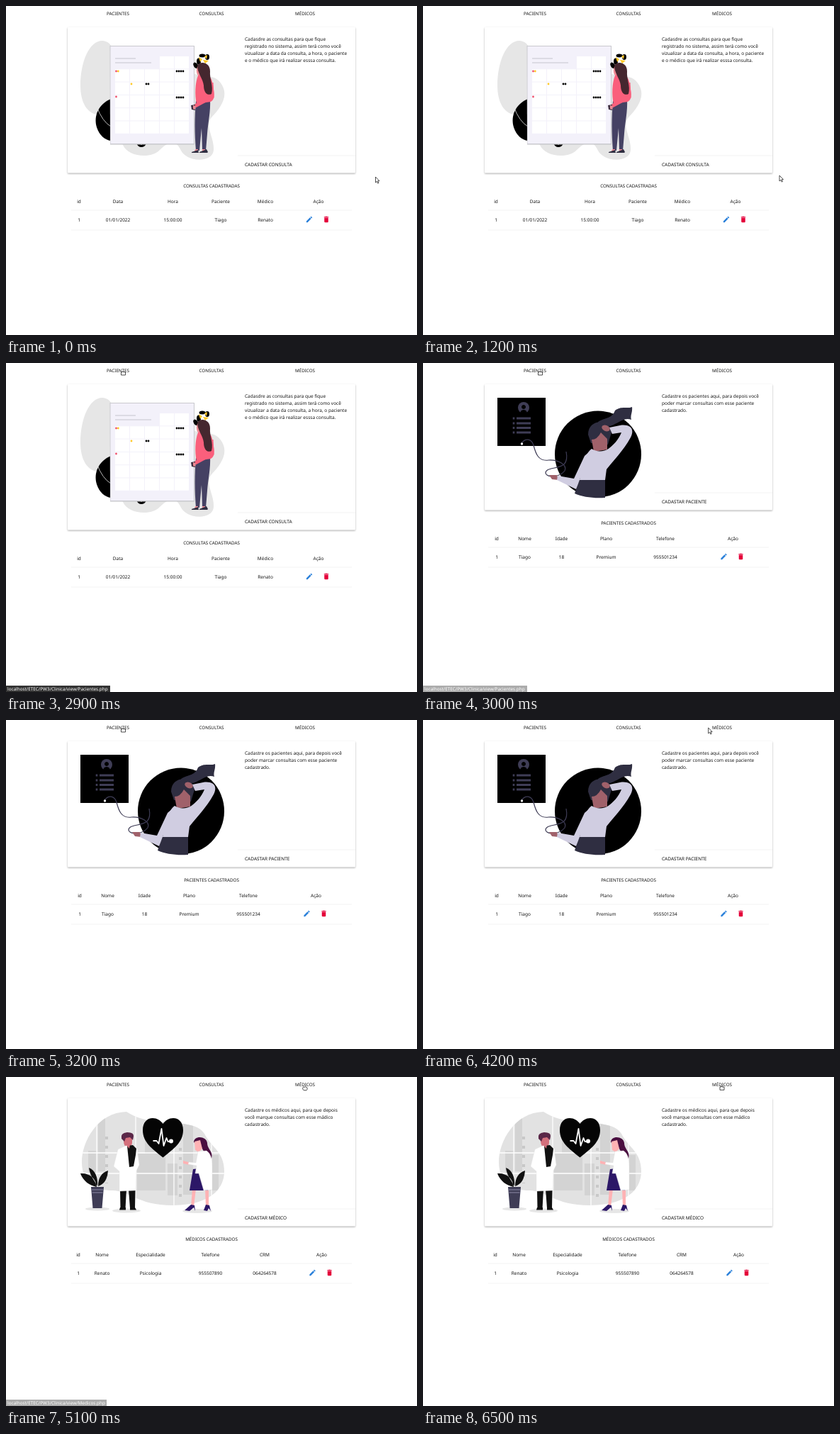
An HTML page that plays this animation: 580x464 px, repeating every 6.7 s.

```html
<!DOCTYPE html>
<html lang="pt">
<head>
<meta charset="utf-8">
<title>Clínica</title>
<style>
html, body { margin: 0; width: 100%; height: 100%; overflow: hidden; background: #fff; }
svg { display: block; width: 580px; height: 464px; }
text { font-family: "Noto Sans", "Open Sans", sans-serif; font-size: 6.5px; fill: #161616; text-rendering: geometricPrecision; }
.caps { font-size: 6.25px; fill: #111; }
.action { font-weight: 500; fill: #111; }
.mid { text-anchor: middle; }
.card { fill: #fff; filter: drop-shadow(0 1.2px .9px rgba(0,0,0,.34)); }
.rule { stroke: #f0f0f0; stroke-width: .8; }
#status text { fill: #fff; font-size: 6.37px; }
</style>
</head>
<body>
<svg viewBox="0 0 580 464">
  <defs>
    <path id="pencil" fill="#2a80da" transform="scale(.46) translate(-12 -12)" d="M3 17.25V21h3.75L17.81 9.94l-3.75-3.75zM20.71 7.04a1 1 0 0 0 0-1.41l-2.34-2.34a1 1 0 0 0-1.41 0l-1.83 1.83 3.75 3.75z"/>
    <path id="trash" fill="#e4003a" transform="scale(.46) translate(-12 -12)" d="M6 19c0 1.1.9 2 2 2h8c1.1 0 2-.9 2-2V7H6zM19 4h-3.5l-1-1h-5l-1 1H5v2h14z"/>
    <clipPath id="blob"><path d="M170 49C130 50 107 90 107 120 107 150 128 160 150 160 175 160 185 181 235 181 285 181 308 160 308 133 308 105 290 100 280 80 265 55 210 75 170 49z"/></clipPath>

    <g id="calendar">
      <path fill="#e6e6e6" d="M137 49C117 48 105 80 105 112 105 140 118 158 140 152L165 196C172 213 205 216 217 203 233 188 240 190 247 204 255 220 292 222 293 203 294 185 280 170 290 157 302 145 312 130 307 116 302 102 290 98 280 100L150 60C148 53 143 50 137 49z"/>
      <path d="M148 131C131 138 123 155 128 171 132 183 140 189 148 190z"/>
      <path d="M128 142Q136 163 148 170" fill="none" stroke="#e6e6e6" stroke-width=".8"/>
      <path d="M184 193q4-1 7 3 4-5 7-2-2 5-7 5-5 0-7-6z"/>
      <path fill="#c9c9ce" d="M146.500 56h119.500v139.500H147z"/>
      <path fill="#f3f1fa" d="M147.500 57h117.500v137h-117.500z"/>
      <path d="M154 74h29M154 80h51" stroke="#dcdbe4" stroke-width="2"/>
      <g id="cells" fill="#fff"></g>
      <g id="dots"></g>
      <g><ellipse cx="268" cy="84" rx="3" ry="5" transform="rotate(-35 268 84)"/><ellipse cx="277" cy="70" rx="4.500" ry="2.500"/><ellipse cx="272" cy="78" rx="3" ry="4.500"/><ellipse cx="284" cy="72" rx="3" ry="4"/></g>
      <path fill="#ffc928" d="M272 72l5 3-3 4zM280 71l4-2-1 6zM278 76l8 1-5 4z"/>
      <path fill="#ed8a94" d="M272 83c-4 3-4 12-1 15l6-1V84z"/>
      <path fill="#454163" d="M268 134l20-3c1 18-3 33-4 49l-2 24h-5l-1-32-3 32h-5c-2-24-2-48 0-70z"/>
      <path fill="#fa5f7c" d="M271 98c8-5 18-2 20 9 3 14 5 24-2 28l-20 3c-3-13-2-30 2-40z"/>
      <path fill="none" stroke="#fa5f7c" stroke-width="5" d="M290 108l1 20-24 13"/>
      <path fill="#45272f" d="M270 84c4-7 18-5 18 8-1 11 5 20 2 32-6 3-11-2-11-12-1-10-9-17-9-28z"/>
      <path fill="#3f3040" d="M261 140l6-1v8l-5-1z"/>
      <path fill="#ed8a94" d="M264 140l4 1-1 5-3-1zM267 202h4v4h-5zM277 202h4v3h-4z"/>
      <path fill="#2f2e41" d="M262 206l9-3 1 4h-10zM273 206l10-4 2 4-1 1h-11z"/>
    </g>

    <g id="profile">
      <path d="M105 49h68v68h-68z"/>
      <circle cx="142" cy="63" r="8" fill="#3f3d56"/>
      <path d="M142 59a3 3 0 1 0 .01 0zM137 72q0-6 5-6t5 6z"/>
      <path d="M132 78h20M132 85h20M132 91.500h20M132 98h20M126.700 78h2.600M126.700 85h2.600M126.700 91.500h2.600M126.700 98h2.600" stroke="#3f3d56" stroke-width="3"/>
      <circle cx="247" cy="128.500" r="61"/>
      <path fill="none" stroke="#3f3d56" stroke-width="1.200" d="M139 113C144 106 153 106 156 116 159 128 163 139 177 137 190 136 204 143 200 152 192 162 174 162 173 155 173 147 190 150 199 143 204 138 203 130 202 125"/>
      <circle cx="139.500" cy="114" r="1.700" fill="#fff"/>
      <path fill="#2f2e41" d="M246 84C256 76 266 80 271 67 280 60 288 65 295 62 296 70 292 74 294 80 284 76 276 85 264 89zM233 101c0-23 32-23 33-3l-5 17-24-2zM221 164l36-1v27c-17 1-32-1-43-6z"/>
      <path fill="#a0616a" d="M238 108q8 0 13-10l9 9v15l-19 3zM178 158l11 0 2 7-9-1z"/>
      <path fill="#d0cde1" d="M238 121C228 128 224 150 221 165L257 165 259 150C268 138 282 125 293 105 300 91 290 86 278 88L263 91 267 100 280 98C276 108 268 117 260 122 252 126 244 125 238 121z"/>
      <path fill="#d0cde1" d="M236 124c-8 16-13 38-20 54l-27-13 1-6 23 4 15-32z"/>
      <ellipse cx="258" cy="92" rx="6" ry="4" fill="#a0616a" transform="rotate(25 258 92)"/>
    </g>

    <g id="doctors">
      <g clip-path="url(#blob)">
        <path fill="#e2e2e2" d="M107 49h201v132H107z"/>
        <path fill="#d3d3d3" d="M130 49h10v84h-10zM116 104h13v60h-13zM185 108h13v52h-13zM196 82h29v78h-29zM228 122h14v45h-14zM250 66h14v100h-14zM288 110h12v50h-12z"/>
        <path fill="none" stroke="#c8c8c8" stroke-width="4" stroke-dasharray="4 9" d="M142 84v66M246 100v70"/>
        <path fill="none" stroke="#fff" stroke-width="1.300" d="M128 49v132M183 49v132M237 49v132M290 49v132M107 107h201M107 136h201"/>
      </g>
      <path fill="#050505" d="M221.500 113.500C206 101 193 92 193 75 193 64 199 58 207 58 213 58 218 61 221.500 66 225 61 230 58 236 58 244 58 250 64 250 75 250 92 237 101 221.500 113.500z"/>
      <path fill="none" stroke="#fff" stroke-width="1.800" stroke-linejoin="round" d="M207.500 90h5l3 4 4-21 3 24 4-11 2 5h4"/>
      <circle cx="233" cy="90.500" r="3" fill="#fff"/>
      <g fill="#e6e6e6"><ellipse cx="129" cy="186" rx="17" ry="2.500"/><ellipse cx="170" cy="188.500" rx="20" ry="3"/><ellipse cx="270" cy="189" rx="21" ry="3"/></g>
      <path fill="#111" d="M128 155C127 143 118 135 105 136 109 147 118 153 128 155zM129 154C124 145 118 138 117 128 126 131 130 142 129 154zM130 154C130 142 135 135 144 132 143 144 139 151 130 154z"/>
      <path fill="#3f3d56" d="M120 155h18l-2.500 30h-13z"/>
      <path d="M121 159h16M121.500 163h15" stroke="#8e8ba8" stroke-width="1"/>
      <path fill="#111" d="M161 158h9l-1.500 28h-7zM173 158h9.500l-.5 27h-7zM161 184h8v3.500h-9zM175 184h7l2 3.500h-9z"/>
      <path fill="#d4707c" d="M166 85h12v8q-1 6-6 7-6-2-6-10z"/>
      <path fill="#5a2748" d="M163 87q-2-8 8-9 10 0 9 6l-1 5-4-4-6 1-2 5z"/>
      <path fill="#fff" stroke="#e2e2e2" stroke-width=".4" d="M158 102l11-5h10l6 4 3 23-4 8-1 28-23 1v-28l-8-7z"/>
      <path fill="#111" d="M171 97l8-1 5 5-1 9-3 16-6 1z"/>
      <path fill="#d4707c" d="M169 95h6l-1 6z"/>
      <path fill="#4a0f40" d="M265 92C265 82 283 83 284 93 284 102 293 105 290 115 282 115 280 105 275 98z"/>
      <path fill="#ffb2b4" d="M266 91l8-2 3 12-5 5-5-3zM250 118l11 3-2 3-9-2zM263 158h5l-3 25h-4zM281 158h5v24h-4z"/>
      <path fill="#2c1767" d="M264 130l16-2 5 32h-26z"/>
      <path fill="#fff" stroke="#dedede" stroke-width=".4" d="M271 105l12-1q8 5 8 22l0 33-12 1-7-24-5 0 2-11-12-2 1-3 10 1z"/>
      <path fill="#2c1767" d="M252 188l9-8 5 1 1 8-2-5-6 5zM279 188l3-8 5 1 2 8-3-4-2 4z"/>
    </g>
  </defs>

  <g id="menu"></g>
  <g id="pages"></g>
  <g id="status"><rect y="455" height="9" fill="#333"/><text x="2" y="462"></text></g>
  <path id="cursor" fill="#fff" stroke="#222" stroke-width=".8" stroke-linejoin="round"/>
</svg>

<script>
const LOOP = 6700, STEP = 100;
const $ = id => document.getElementById(id);

// y is the middle of the line
const text = (s, x, y, cls = '') => `<text x="${x}" y="${y + 2.3}" class="${cls}">${s}</text>`;
const line = (x1, x2, y) => `<path class="rule" d="M${x1} ${y}H${x2}"/>`;

const pages = [
  { art: 'calendar', bottom: 236, action: 'CADASTAR CONSULTA', title: 'CONSULTAS CADASTRADAS',
    intro: ['Cadasdre as consultas para que fique', 'registrado no sistema, assim terá como você',
      'vizualizar a data da consulta, a hora, o paciente', 'e o médico que irá realizar esssa consulta.'],
    columns: [['id', '1', 103], ['Data', '01/01/2022', 158], ['Hora', '15:00:00', 235.5],
      ['Paciente', 'Tiago', 303], ['Médico', 'Renato', 366], ['Ação', '', 441]] },
  { art: 'profile', bottom: 208, action: 'CADASTAR PACIENTE', title: 'PACIENTES CADASTRADOS',
    intro: ['Cadastre os pacientes aqui, para depois você', 'poder marcar consultas com esse paciente', 'cadastrado.'],
    columns: [['id', '1', 104], ['Nome', 'Tiago', 143.5], ['Idade', '18', 195.5],
      ['Plano', 'Premium', 258.5], ['Telefone', '955501234', 342], ['Ação', '', 437.5]] },
  { art: 'doctors', bottom: 211, action: 'CADASTAR MÉDICO', title: 'MÉDICOS CADASTRADOS',
    intro: ['Cadastre os médicos aqui, para que depois', 'você marque consultas com esse mádico', 'cadastrado.'],
    columns: [['id', '1', 102], ['Nome', 'Renato', 135.5], ['Especialidade', 'Psicologia', 204],
      ['Telefone', '955507890', 288.5], ['CRM', '064264578', 365], ['Ação', '', 445.5]] }
];

function pageMarkup({ art, bottom, action, title, intro, columns }) {
  const actionX = columns.at(-1)[2], rowY = bottom + 65.7;
  return `<g><rect class="card" x="87" y="30" width="406" height="${bottom - 30.5}" rx="1"/>
    <use href="#${art}"/>
    ${intro.map((s, i) => text(s, 337, 46.5 + i * 10)).join('')}
    ${line(327, 493, bottom - 25)}${text(action, 337, bottom - 12.7, 'action')}
    ${text(title, 290, bottom + 17.3, 'caps mid')}
    ${columns.map(([head, value, x]) => text(head, x, bottom + 40, 'mid') + text(value, x, rowY, 'mid')).join('')}
    ${line(92, 488, bottom + 52)}${line(92, 488, bottom + 80)}
    <use href="#pencil" x="${actionX - 13}" y="${rowY - .7}"/><use href="#trash" x="${actionX + 11}" y="${rowY - .7}"/></g>`;
}

$('menu').innerHTML = [['PACIENTES', 158], ['CONSULTAS', 290], ['MÉDICOS', 422]]
  .map(([s, x]) => text(s, x, 11, 'caps mid')).join('');
$('pages').innerHTML = pages.map(pageMarkup).join('');

let cells = '';
for (let row = 0; row < 6; row++)
  for (let col = row ? 0 : 3; col < 5; col++)
    cells += `<rect x="${154 + col * 21}" y="${71 + row * 18.3}" width="20" height="17.3"/>`;
$('cells').innerHTML = cells;

const dots = (x, y, n, color) => Array.from({ length: n }, (_, i) =>
  `<circle cx="${x + i * 3}" cy="${y}" r="1.4" fill="${color}"/>`).join('');
$('dots').innerHTML = dots(155.5, 92, 1, '#f0526e') + dots(158.3, 92, 1, '#ffc928') + dots(177, 110, 1, '#ffc928') +
  dots(155.5, 128, 1, '#f0526e') + dots(241, 92, 4, '#000') + dots(198, 110, 2, '#000') + dots(241, 129, 4, '#000');

// time, x, y
const path = [[0, 521.5, 241], [1100, 521.5, 241], [1200, 503, 239], [1400, 503, 239], [1500, 430, 214],
  [1600, 349, 182], [1800, 240, 85], [1900, 190, 42], [2000, 180, 27], [2100, 174.8, 22.3],
  [2300, 161.5, 9.5], [3400, 161.5, 9.5], [4100, 395, 11], [4400, 418, 10.8], [LOOP, 418, 10.8]];

function cursorAt(t) {
  const i = path.findIndex(key => key[0] > t);
  const [t0, x0, y0] = path[i - 1], [t1, x1, y1] = path[i];
  const k = (t - t0) / (t1 - t0);
  return [x0 + (x1 - x0) * k, y0 + (y1 - y0) * k];
}

const arrow = 'M0 0V8L1.900 6.300 3.200 9.100 4.500 8.500 3.200 5.700H5.500Z';
const hand = 'M1 3.200H2.500V2.500H4V3.200H7V7.500H1Z';
const pressed = 'M.8 4.300L2 3 3.200 3.700 4.500 3 6 3.500 7 4.300V6.700L6 8H2.200L.8 6.300Z';
const overLink = (x, y) => y < 14 && [[142, 174], [273, 307], [408, 436]].some(([a, b]) => x >= a && x <= b);

function statusAt(t) {
  const first = t < 4000, [on, off] = first ? [2500, 3000] : [4600, 5100];
  const opacity = t < on || t > off ? 0 : t === on || t === off ? .4 : 1;
  return { opacity, width: first ? 147 : 142, file: first ? 'Pacientes' : 'Medicos' };
}

function draw(now) {
  const t = Math.floor(now % LOOP / STEP) * STEP;
  const current = t < 3000 ? 0 : t < 5100 ? 1 : 2;
  [...$('pages').children].forEach((page, i) => page.style.display = i === current ? '' : 'none');

  const { opacity, width, file } = statusAt(t);
  const [bar, label] = $('status').children;
  $('status').setAttribute('opacity', opacity);
  bar.setAttribute('width', width);
  label.textContent = `localhost/ETEC/PW3/Clinica/view/${file}.php`;

  const [x, y] = cursorAt(t);
  const shape = !overLink(x, y) ? arrow : t >= 4900 && t < 6500 ? pressed : hand;
  $('cursor').setAttribute('d', shape);
  $('cursor').setAttribute('transform', `translate(${x} ${y})`);
  requestAnimationFrame(draw);
}
requestAnimationFrame(draw);
</script>
</body>
</html>
```
